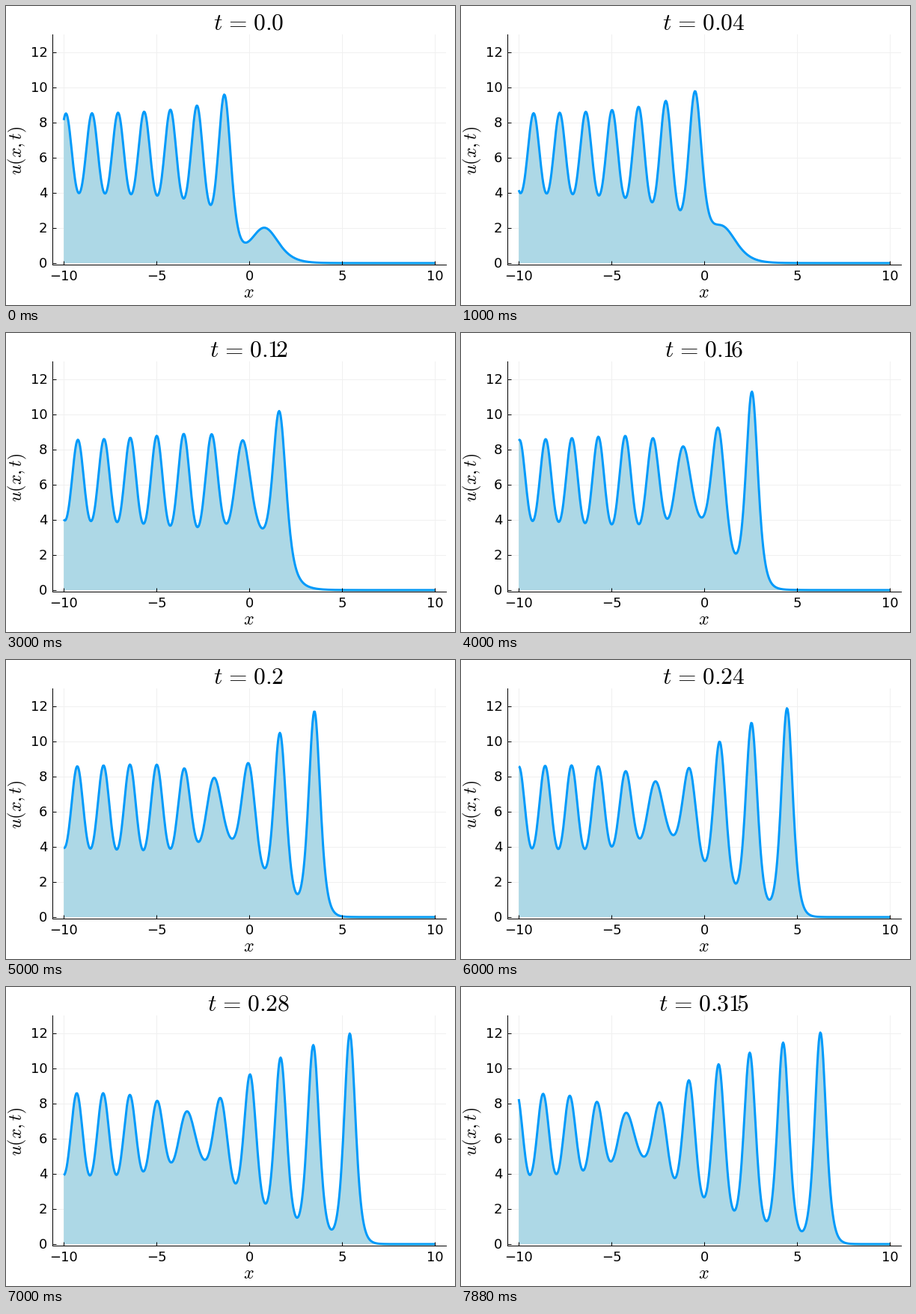
A matplotlib script that plays this animation: 600x400 px, repeating every 8000 ms.

```python
import numpy as np
import matplotlib.pyplot as plt
from matplotlib.animation import FuncAnimation

# KdV soliton gas on the band [1.5, 2.5] meeting one slow soliton.
# u = 2 (log tau)'' with tau = det(I + A),
# A_ij = c_i c_j exp(-(k_i + k_j) x + 4 (k_i^3 + k_j^3) t) / (k_i + k_j)

W, H, DPI = 600, 400, 100
FRAMES, INTERVAL, DT = 64, 125, 0.005
LEFT, RIGHT, TOP, BOTTOM = 62.3, 588.3, 38.3, 346.3
BLUE, FILL = "#009afa", "#add8e6"

# Gauss-Chebyshev nodes for the density sqrt((k - 1.5)(2.5 - k)) / pi
NODES = 32
theta = np.pi * np.arange(1, NODES + 1) / (NODES + 1)
K = np.append(2 + 0.5 * np.cos(theta), 1.0)
C2 = np.append(np.sin(theta) ** 2 / (4 * (NODES + 1)), 10.0)

STEP, PAD = 0.04, 3
GRID = STEP * np.arange(-250 - PAD, 251 + PAD)
X = GRID[PAD:-PAD]
STENCIL = np.array([2, -27, 270, -490, 270, -27, 2]) / (180 * STEP ** 2)


def log_tau(t):
    """log det(I + A) on the grid, by an exact pivoted Cauchy factorisation."""
    v = np.sqrt(C2) * np.exp(-K * GRID[:, None] + 4 * K ** 3 * t)
    row = np.arange(len(GRID))
    columns, pivots = [], []
    for _ in K:
        p = np.argmax(v * v / K, axis=1)
        kp, vp = K[p][:, None], v[row, p][:, None]
        columns.append(v / vp * 2 * kp / (K + kp))
        pivots.append((vp ** 2 / (2 * kp))[:, 0])
        v = v * (K - kp) / (K + kp)
    low, d = np.stack(columns, 1), np.stack(pivots, 1)
    e = np.sqrt(d / (1 + d))
    m = e[:, :, None] * (low @ low.transpose(0, 2, 1)) * e[:, None, :]
    i = np.arange(len(K))
    m[:, i, i] += 1 / (1 + d)
    return np.log1p(d).sum(axis=1) + np.linalg.slogdet(m)[1]


def wave(t):
    return 2 * np.convolve(log_tau(t), STENCIL, mode="valid")


def pt(px):
    return px * 72 / DPI


plt.rcParams["font.family"] = "DejaVu Sans"
plt.rcParams["mathtext.fontset"] = "cm"

fig = plt.figure(figsize=(W / DPI, H / DPI), dpi=DPI, facecolor="white")
ax = fig.add_axes([LEFT / W, 1 - BOTTOM / H, (RIGHT - LEFT) / W, (BOTTOM - TOP) / H])
ax.set(xlim=(-10.6, 10.6), ylim=(-0.1, 13))
ax.spines[["top", "right"]].set_visible(False)
ax.spines[["left", "bottom"]].set_linewidth(pt(1))


def label(x, y, s, size, ha="center", **kw):
    """Text with its baseline at pixel (x, y), counted from the top left."""
    return fig.text(x / W, 1 - y / H, s, fontsize=pt(size), ha=ha, va="baseline", **kw)


def sign(n):
    return str(n).replace("-", "\u2212")


x_ticks, y_ticks = range(-10, 11, 5), range(0, 13, 2)
ax.set_xticks(x_ticks, [])
ax.set_yticks(y_ticks, [])
ax.tick_params(direction="in", length=pt(5), width=pt(1), zorder=2.5)
ax.set_axisbelow(False)

grid_style = dict(color="#f0f0f0", lw=pt(1), zorder=0.5)
x_scale = (RIGHT - LEFT) / 21.2
y_scale = (BOTTOM - TOP) / 13.1
for n in x_ticks:
    ax.axvline(n, **grid_style)
    label(LEFT + (n + 10.6) * x_scale, 367, sign(n), 18)
for n in y_ticks:
    ax.axhline(n, **grid_style)
    label(55.5, BOTTOM - (n + 0.1) * y_scale + 6.5, sign(n), 18, ha="right")

label(324.5, 390.5, "$x$", 24)
label(21, 193.5, "$u(x,t)$", 24, rotation=90, rotation_mode="anchor")
title = label(324.5, 31, "", 31.5)

times = [round(i * DT, 3) for i in range(FRAMES)]
waves = [wave(t) for t in times]

area, = ax.fill(X, 0 * X, color=FILL, lw=0, zorder=1)
curve, = ax.plot(X, 0 * X, color=BLUE, lw=pt(3), zorder=2,
                 solid_capstyle="butt", solid_joinstyle="round")


def draw(i):
    u = waves[i]
    curve.set_ydata(u)
    area.set_xy(np.column_stack([np.r_[X[0], X, X[-1]], np.r_[0, u, 0]]))
    number = str(times[i]).replace("1", r"1\!")
    title.set_text(rf"$t\hspace{{0.116}}=\hspace{{0.116}}{number}$")
    return area, curve, title


anim = FuncAnimation(fig, draw, frames=FRAMES, interval=INTERVAL,
                     repeat=True, repeat_delay=0, blit=False)
plt.show()
```
